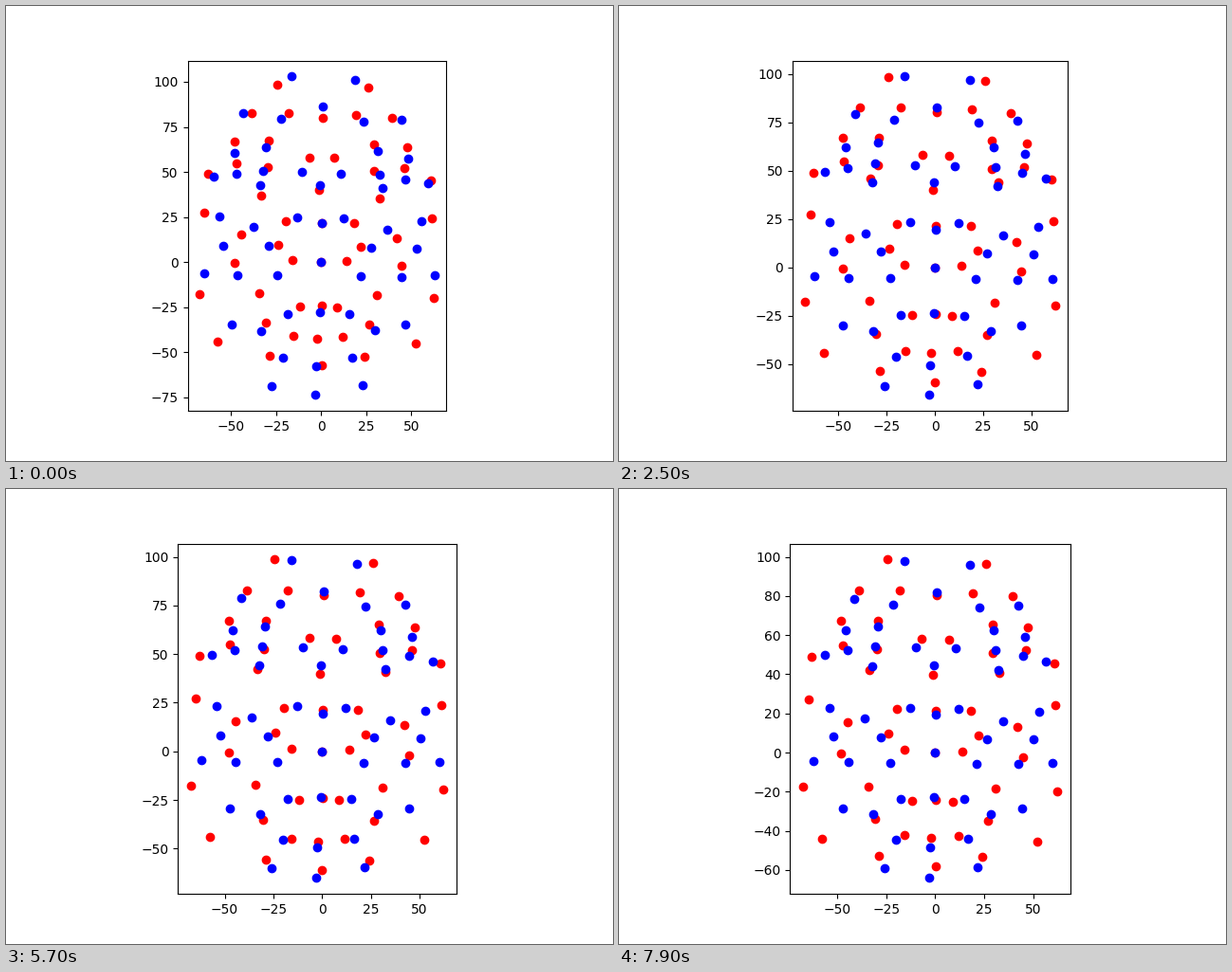
A matplotlib script that plays this animation: 640x480 px, repeating every 8 s.

```python
import numpy as np
import matplotlib.pyplot as plt
from matplotlib.animation import FuncAnimation

FRAMES, STEP = 80, 100


def face(pairs, middle):
    """Mirror (half width, height) pairs and add the midline points."""
    right = np.array(pairs, float)
    return np.vstack([right * (-1, 1), right, middle])


RED = face(
    [(25.2, 97.6), (39, 81.4), (18.5, 82.2), (47.7, 65.5), (29.1, 66.3),
     (61.7, 47.1), (46.6, 53.5), (29.5, 51.7), (6.9, 57.9), (63, 25.6),
     (43.3, 14.3), (19, 22), (23, 9.1), (46.2, -1.3), (14.8, 1),
     (64.9, -18.7), (32.6, -17.9), (10.3, -24.9), (28.6, -34),
     (13.6, -41.3), (55, -44.7), (26.4, -52)],
    [(0, 80.2), (-1.1, 39.9), (1, 21.5), (.9, 0), (1.6, -24),
     (-.4, -42.5), (2.2, -57.3)])
LIDS = face([(33, 36)], np.empty((0, 2)))

BLUE = face(
    [(16.8, 96.8), (41.7, 76.7), (21.8, 74.8), (45.8, 60.7), (29.6, 63.4),
     (56.5, 48.3), (44.6, 50.8), (30.8, 53.4), (10.2, 53.4), (32.2, 43.2),
     (53.4, 21.7), (35.2, 16.6), (12.4, 22.6), (27.2, 7.4), (51.2, 7.4),
     (60.9, -4.8), (43.4, -5.5), (22, -5.5), (16.3, -23.9), (45.8, -28.7),
     (30, -31.6), (18.4, -44.3), (23.8, -59)],
    [(0, 81.8), (-.5, 44.5), (1, 19.2), (.9, 0), (.9, -22.9),
     (-.5, -48.6), (-.7, -64.1)])


def curve(*knots):
    xs, ys = zip(*knots)
    return lambda v: np.interp(v, xs, ys)


# Vertical pull of a full stretch at each height: jaw down, brow up, eyes shut.
pull = curve((-64, -9.6), (-45, -8.9), (-25, -5.2), (-6, -2.4), (0, 0),
             (20, 2.6), (42, -1), (53, -4), (63, -.9), (75, 4), (97, 5.2))

# Expression over time in ms.
stretch = curve((0, 1), (1400, 1.21), (1800, 1.05), (2100, .05), (2500, .2),
                (3400, .36), (4900, .18), (6400, .03), (7000, -.16),
                (7500, -.16), (7900, 0))
lift = curve((0, 0), (300, 8), (1400, 10.3), (3400, 7.8), (4900, 3.3),
             (6400, 7.6), (7900, 5.4))
jaw = curve((0, 0), (2500, 2), (3400, 2), (4900, 7.5), (6400, .3), (7900, 1))
spread = curve((0, 1), (1400, 1), (3400, .996), (4900, .995), (6400, 1.007),
               (7000, 1.01), (7500, 1.01), (7900, 1.002))


def lean(p, tilt, twist, bow=0):
    """Tip the symmetric face slightly to one side."""
    x, y = p.T
    return np.column_stack([x - .9 + .02 * y - bow * x ** 2,
                            y - x * (tilt + twist * y)])


def red_at(t):
    p = RED.copy()
    x, y = p.T
    mouth = (abs(x) < 40) * np.clip((-y - 30) / 10, 0, 1)
    p[:, 1] -= jaw(t) * mouth
    p = np.vstack([p, LIDS + (0, lift(t))])
    return lean(p, .02, .0002, .0003) * (spread(t), 1)


def blue_at(t):
    s = stretch(t)
    x, y = BLUE.T
    p = np.column_stack([x * (1 + .05 * s), y + s * pull(y)])
    return lean(p, .012, .0004)


fig, ax = plt.subplots(figsize=(6.4, 4.8), dpi=100)
ax.set_aspect("equal", adjustable="box")
red, = ax.plot([], [], "ro")
blue, = ax.plot([], [], "bo")


def update(i):
    t = i * STEP
    red.set_data(*red_at(t).T)
    blue.set_data(*blue_at(t).T)
    ax.relim()
    ax.autoscale_view()
    return red, blue


anim = FuncAnimation(fig, update, frames=FRAMES, interval=STEP,
                     repeat=True, repeat_delay=0, blit=False)
plt.show()
```
